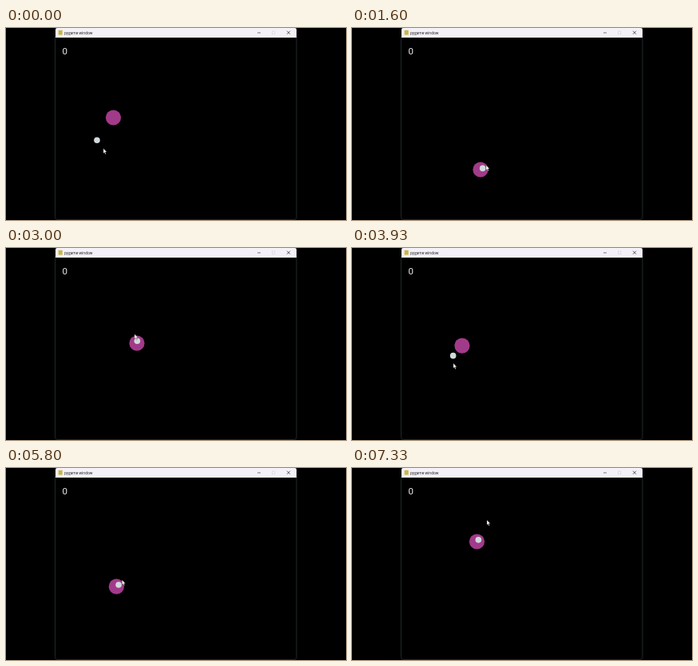
These frames come from a looping animation (426 px wide and 240 px high, 7.39 s). An HTML page:

```html
<!DOCTYPE html>
<html lang="en">
<head>
<meta charset="utf-8">
<title>pygame window</title>
<style>
  html, body { margin: 0; width: 100%; height: 100%; overflow: hidden; background: #000; }
  svg { display: block; width: 100%; height: 100%; }
</style>
</head>
<body>
<svg viewBox="0 0 426 240">
  <rect width="426" height="240" fill="#000"/>
  <path d="M61.5 11V236.5Q61.5 239.5 64.5 239.5H361Q364 239.5 364 236.5V11" fill="none" stroke="#20282a"/>
  <path d="M62 12V2Q62 0 64 0H362Q364 0 364 2V12Z" fill="#f5f1f9"/>
  <rect x="65.7" y="2.8" width="5" height="5.8" fill="#c9b545"/>
  <text x="73" y="7.6" font-family="'Open Sans', 'Noto Sans', sans-serif" font-size="4.7" fill="#111">pygame window</text>
  <g fill="none" stroke-width=".8">
    <path d="M315 6H319" stroke="#555"/>
    <rect x="333.3" y="4" width="3.6" height="3.6" stroke="#d3d2d6" stroke-width=".6"/>
    <path d="M352 3.7L356 7.7M356 3.7L352 7.7" stroke="#333"/>
  </g>
  <text x="70.6" y="32.8" font-family="Roboto, sans-serif" font-size="11.5" fill="#eee">0</text>
  <circle id="ball" r="9.6" fill="#a23a8a"/>
  <circle id="dot" r="3.8" fill="#d0dadb"/>
  <path id="pointer" d="M0 0V6.2L1.4 5L2.4 7.3L3.4 6.9L2.4 4.6H4.3Z" fill="#fff" stroke="#000" stroke-width=".3"/>
</svg>
<script>
const LOOP = 7390;
const STEP = 200 / 3;

// Turning points of the ball and the pointer; everything else follows from them.
const keys = [
  { time: 0, ball: [134.5, 112], pointer: [122, 150.5] },
  { time: 1600, ball: [161, 177], pointer: [168, 171.5] },
  { time: 3000, ball: [164, 119], pointer: [161, 107.5] },
  { time: 3930, ball: [138, 122], pointer: [127, 144] },
  { time: 5000, ball: [131, 176], pointer: [138, 165] },
  { time: 6600, ball: [148.5, 108], pointer: [154, 103.5] },
  { time: 7330, ball: [156.5, 92], pointer: [169, 65] }
];
const last = keys.length - 1;

function slope(name, i, axis) {
  const a = keys[Math.max(i - 1, 0)], b = keys[Math.min(i + 1, last)];
  return (b[name][axis] - a[name][axis]) / (b.time - a.time);
}

// Smooth curve through the turning points.
function position(name, t) {
  const next = keys.findIndex(key => key.time > t);
  const j = next < 0 ? last : next, i = j - 1;
  const span = keys[j].time - keys[i].time;
  const u = (t - keys[i].time) / span, v = 1 - u;
  return [0, 1].map(axis =>
    v * v * (1 + 2 * u) * keys[i][name][axis]
    + u * u * (3 - 2 * u) * keys[j][name][axis]
    + u * v * span * (v * slope(name, i, axis) - u * slope(name, j, axis)));
}

// The dot leans from the ball towards the pointer, further when hanging below.
function dotPosition(ball, pointer) {
  const dx = pointer[0] - ball[0], dy = pointer[1] - ball[1];
  const pull = 0.35 + 0.01 * dy;
  return [ball[0] + pull * (dx - 0.4 * dy), ball[1] + pull * dy];
}

function place(id, [x, y]) {
  document.getElementById(id).setAttribute("transform", `translate(${x.toFixed(2)} ${y.toFixed(2)})`);
}

function draw(ms) {
  // 15 pictures a second, with boundaries on a 10 ms clock.
  const clock = Math.floor(ms % LOOP / 10) * 10;
  const t = Math.min(Math.floor((clock + 3.4) / STEP) * STEP, keys[last].time);
  const ball = position("ball", t), pointer = position("pointer", t);
  place("ball", ball);
  place("dot", dotPosition(ball, pointer));
  place("pointer", pointer);
}

const start = performance.now();
function tick() {
  draw(performance.now() - start);
  requestAnimationFrame(tick);
}
tick();
</script>
</body>
</html>
```
